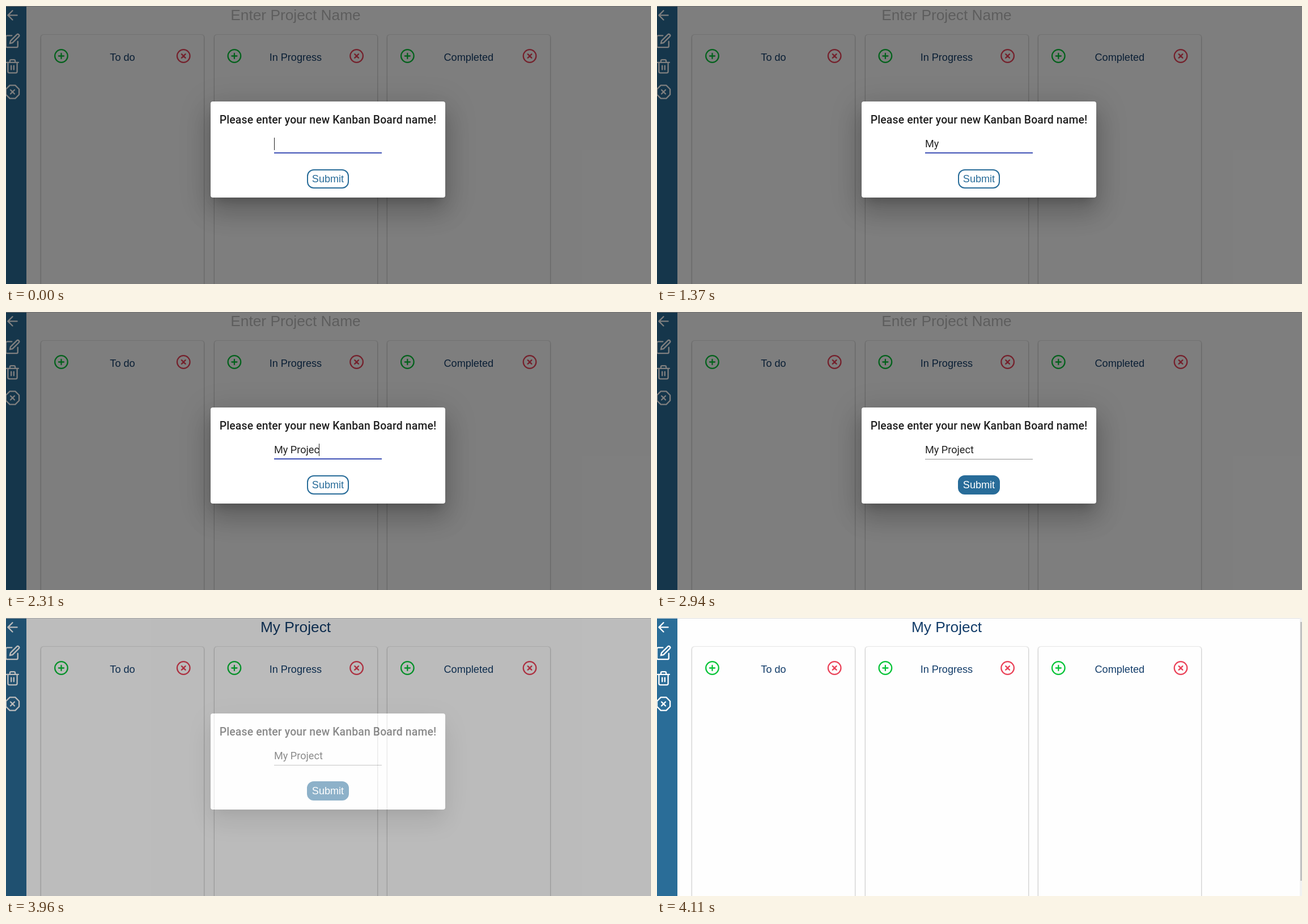
Write an HTML page that moves like this. It is 1138 by 492 pixels and loops after 5420 ms.

```html
<!DOCTYPE html>
<html lang="en">
<head>
<meta charset="utf-8">
<title>Kanban board</title>
<style>
  html, body { margin: 0; width: 100%; height: 100%; overflow: hidden; background: #fefefe; }
  body { position: relative; }
  body *:not(span) { position: absolute; box-sizing: border-box; }
  svg * { position: static; }
  svg { left: 0; top: 0; width: 1138px; height: 492px; fill: none; stroke-linecap: round; stroke-linejoin: round; }
  svg text { fill: #123c69; text-anchor: middle; font: 18.1px "Liberation Sans", Arial, sans-serif; }
  #title { font-size: 26.3px; }
  #top { width: 100%; height: 1px; background: #dedede; }
  #side { width: 36px; height: 100%; background: #2a6d98; }
  .card { top: 51px; width: 287px; height: 500px; border-radius: 4px; background: #fefefe;
    box-shadow: 0 0 1px rgba(0,0,0,.35), 0 1px 3px rgba(0,0,0,.4); }
  #bar { right: 0; width: 4px; height: 100%; background: #f1f1f1; }
  #bar i { left: 1px; top: 7px; width: 3px; height: 458px; background: #c1c1c1; }
  #modal { inset: 0; background: rgba(0,0,0,.5); }
  #box { left: 361px; top: 169px; width: 414px; height: 170px; border-radius: 4px; background: #fff; color: rgba(0,0,0,.87);
    font-family: Roboto, sans-serif; white-space: pre;
    box-shadow: 0 12px 17px -8px rgba(0,0,0,.2), 0 27px 43px 3px rgba(0,0,0,.14), 0 10px 52px 9px rgba(0,0,0,.12); }
  #ask { left: 0; top: 18px; width: 100%; text-align: center; font-size: 19.4px; line-height: 30px; font-weight: 500; letter-spacing: .0075em; }
  #field { left: 112px; top: 64px; width: 190px; height: 28px; font-size: 18.1px; line-height: 22px; }
  #caret { top: 0; width: 1px; height: 22px; background: #222; }
  #rule { left: 0; top: 27px; width: 100%; height: 1px; background: rgba(0,0,0,.42); }
  #focus { left: 0; top: 26px; width: 100%; height: 2px; background: #3f51b5; }
  #submit { left: 170px; top: 120px; width: 74px; height: 34px; border: 2px solid #286c99; border-radius: 12px;
    text-align: center; font: 18.1px/30px "Liberation Sans", Arial, sans-serif; }
</style>
</head>
<body>
<div id="side"></div>
<div id="top"></div>
<div class="card" style="left:62px"></div>
<div class="card" style="left:367.5px"></div>
<div class="card" style="left:673px"></div>
<svg viewBox="0 0 1138 492" id="page"><text id="title" x="511" y="25"></text></svg>
<div id="bar"><i></i></div>
<div id="modal">
  <div id="box">
    <div id="ask">Please enter your new Kanban Board name!</div>
    <div id="field"><span id="typed"></span><i id="caret"></i><div id="rule"></div><div id="focus"></div></div>
    <div id="submit">Submit</div>
  </div>
</div>
<script>
const LOOP = 5420, NAME = 'My Project';
const $ = id => document.getElementById(id);

// Icons live on a 24-unit grid, centred on (x, y).
const icon = (x, y, scale, color, d) =>
  `<path transform="translate(${x} ${y}) scale(${scale}) translate(-12 -12)" stroke="${color}" stroke-width="2" d="${d}"/>`;
const ring = 'M2 12a10 10 0 1 0 20 0a10 10 0 1 0-20 0';
const cross = 'M15 9l-6 6M9 9l6 6';
const tools = [
  'M19 12H5M12 19l-7-7 7-7',
  'M11 4H4a2 2 0 0 0-2 2v14a2 2 0 0 0 2 2h14a2 2 0 0 0 2-2v-7M18.5 2.5a2.12 2.12 0 0 1 3 3L12 15l-4 1 1-4z',
  'M3 6h18M19 6v14a2 2 0 0 1-2 2H7a2 2 0 0 1-2-2V6M8 6V4a2 2 0 0 1 2-2h4a2 2 0 0 1 2 2v2M10 11v6M14 11v6',
  'M7.86 2h8.28L22 7.86v8.28L16.14 22H7.86L2 16.14V7.86z' + cross
];
let art = tools.map((d, i) => icon(11.5, 16.4 + 45.2 * i, 1.16, '#fff', d)).join('');
['To do', 'In Progress', 'Completed'].forEach((label, i) => {
  const x = 62 + 305.4 * i;
  art += icon(x + 35.5, 88.5, 1.13, '#07c438', ring + 'M12 8v8M8 12h8')
    + icon(x + 251.2, 88.5, 1.13, '#ea4258', ring + cross)
    + `<text x="${x + 143.5}" y="97">${label}</text>`;
});
$('page').insertAdjacentHTML('beforeend', art);

// Tables of [start ms, value]; each value holds until the next start.
const typing = [[0, 0], [590, 1], [740, 2], [820, 3], [1670, 4], [1840, 5], [1920, 6],
  [2150, 7], [2230, 8], [2310, 9], [2540, 10]];
const caret = [[0, 1], [510, 0], [590, 1], [1370, 0], [1670, 1], [2780, 0]];
const blur = [[0, 0], [2780, .4], [2860, .85], [2940, 1]];
const fade = [[0, 1], [3960, .52], [4030, .1], [4110, 0]];
const at = (table, t) => table.findLast(([start]) => start <= t)[1];

function draw(t) {
  const named = t >= 3870, left = at(blur, t), shown = at(fade, t);
  $('title').textContent = named ? NAME : 'Enter Project Name';
  $('title').style.fill = named ? '' : '#bcbcbc';
  $('typed').textContent = NAME.slice(0, at(typing, t));
  $('caret').style.left = Math.floor($('typed').getBoundingClientRect().width) + 'px';
  $('caret').style.opacity = at(caret, t);
  $('focus').style.transform = `scaleX(${1 - left})`;
  $('submit').style.background = `rgba(40,108,153,${left})`;
  $('submit').style.color = `color-mix(in srgb, #fff ${left * 100}%, #286c99)`;
  $('modal').style.opacity = shown;
  $('bar').style.opacity = shown ? 0 : 1;
}

const begin = performance.now();
function tick() {
  draw((performance.now() - begin) % LOOP);
  requestAnimationFrame(tick);
}
tick();
</script>
</body>
</html>
```
